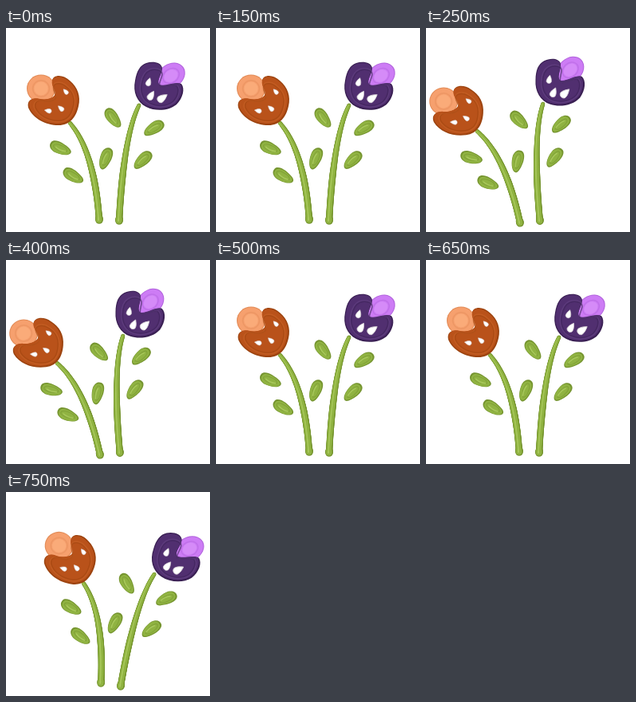
Write an HTML page that moves like this. It is 256 px wide and 256 px high and loops after 1 s.

```html
<!DOCTYPE html>
<html lang="en">
<head>
<meta charset="utf-8">
<title>Swaying flowers</title>
<style>
  html, body { margin: 0; width: 100%; height: 100%; overflow: hidden; background: #fff; }
  svg { display: block; width: 100vw; height: 100vh; }
</style>
</head>
<body>
<svg id="stage" viewBox="0 0 256 256"></svg>
<script>
const GREEN = { rim: '#75942f', main: '#90b342', light: '#a8c85c' };
const ORANGE = { rim: '#9c430f', main: '#b9521a', light: '#cd682d' };
const PEACH = { rim: '#e28c58', main: '#f6a06e', light: '#ffb888' };
const PURPLE = { rim: '#391f52', main: '#512f70', light: '#6c4a8a' };
const VIOLET = { rim: '#b163dc', main: '#cd7cf5', light: '#e09dfd' };

function add(parent, tag, attrs = {}) {
  const node = document.createElementNS('http://www.w3.org/2000/svg', tag);
  for (const key in attrs) node.setAttribute(key, attrs[key]);
  parent.appendChild(node);
  return node;
}

const stage = document.getElementById('stage');
const bouquet = add(stage, 'g');

const group = (parent, x, y, turn = 0, size = 1) => add(parent, 'g', {
  transform: `translate(${x} ${y}) rotate(${turn}) scale(${size})`
});

const line = (parent, d, stroke, width, extra = {}) => add(parent, 'path', {
  d, fill: 'none', stroke, 'stroke-width': width,
  'stroke-linecap': 'round', 'stroke-linejoin': 'round', ...extra
});

// Thick paint: a dark rim around a slightly smaller, raised face.
function paint(parent, d, color, inset = 0.95) {
  add(parent, 'path', { d, fill: color.rim });
  add(parent, 'path', { d, fill: color.main, transform: `translate(-.3 -.4) scale(${inset})` });
}

// Round beads along a cubic curve, growing thicker toward the foot.
function stem(x0, y0, x1, y1, x2, y2, x3, y3) {
  const bead = (shift, trim, fill) => {
    for (let i = 0; i <= 160; i++) {
      const t = i / 160, u = 1 - t;
      const at = (a, b, c, d) => u*u*u*a + 3*u*u*t*b + 3*u*t*t*c + t*t*t*d;
      const r = 2.4 + 1.7 * Math.min(1, t * 1.6) + (t > .98 ? .7 : 0);
      add(bouquet, 'circle', { cx: at(x0, x1, x2, x3) + shift, cy: at(y0, y1, y2, y3), r: r * trim, fill });
    }
  };
  bead(0, 1, GREEN.rim);
  bead(-.3, .74, GREEN.main);
  bead(-.9, .2, GREEN.light);
}

function leaf(x, y, turn) {
  const g = group(bouquet, x, y, turn);
  paint(g, 'M-14 0C-13-5-2-8 6-7.5C13-6 15-2 14 2C13 6 7 7.5 1 7C-7 6-15 4-14 0Z', GREEN, 0.88);
  line(g, 'M-9 0C-3-4 4-4 9-2C11 1 7 3.5 2 3.5C-3 4-8 3-9 0', GREEN.rim, 1, { opacity: .55 });
  line(g, 'M-7-1Q0-3 6-1', GREEN.light, 1.5);
}

function petal(parent, x, y, turn, rx, ry, color) {
  const g = group(parent, x, y, turn);
  const oval = (scale, attrs) => add(g, 'ellipse', { rx: rx * scale, ry: ry * scale, ...attrs });
  oval(1, { fill: color.rim });
  oval(.94, { fill: color.main });
  oval(.58, { fill: 'none', stroke: color.rim, 'stroke-width': 1.5, opacity: .45 });
  oval(.48, { fill: color.light, opacity: .45 });
}

function body(parent, d, color) {
  paint(parent, d, color);
  const ridge = (scale, stroke) => line(parent, d, stroke, 1.5 / scale, {
    transform: `translate(1 2) scale(${scale})`, opacity: .45
  });
  ridge(.8, color.light);
  ridge(.75, color.rim);
}

function spot(parent, x, y, turn, size) {
  add(group(parent, x, y, turn, size), 'path', {
    d: 'M-7 0C-4-2-1-4 3-4C7-3 7 3 3 4C-1 4-4 2-7 0Z',
    fill: '#fff', stroke: '#d9d2d8', 'stroke-width': .8
  });
}

stem(80, 119, 104, 146, 114, 196, 117, 241);
stem(167, 97, 150, 130, 144, 200, 142, 242);

leaf(68.5, 151, 205);
leaf(84.5, 185.5, 212);
leaf(134.5, 113, 234);
leaf(125, 164, -68);
leaf(185.5, 126, -31);
leaf(171.5, 166, -43);

const orange = group(bouquet, 60, 91);
petal(orange, -16, -15, 0, 18, 17.5, PEACH);
body(orange, 'M-2-25C-1-33 12-33 20-25C30-17 34-5 31 7C28 21 20 31 6 31C-10 31-26 23-32 9C-34 0-28-4-19-2C-11 0 0-2 2-8C3-13-3-18-2-25Z', ORANGE);
spot(orange, 15, -11, 48, .62);
spot(orange, 9, 10, 42, .68);
spot(orange, -7, 13, 12, .68);

const purple = group(bouquet, 192, 73);
petal(purple, 15, -13, -35, 19, 15, VIOLET);
body(purple, 'M-16-29C-8-32 3-30 4-23C4-15-3-8 0-2C8 2 20-6 28-3C33 3 30 15 22 23C12 31-4 32-16 26C-28 20-33 7-30-7C-28-19-24-26-16-29Z', PURPLE);
spot(purple, -13, -5, 108, .8);
spot(purple, -10, 12, 122, .95);
spot(purple, 4, 15, 145, 1.08);

// The bouquet tilts rigidly around its feet: centre, left, centre, right.
const STEP = 250;
const start = performance.now();
function tick() {
  const step = Math.floor((performance.now() - start) / STEP);
  const sway = -Math.round(Math.sin(step * Math.PI / 2));
  const angle = 7.6 * sway + 0.65 * -Math.abs(sway);
  const dx = 1.5 * Math.abs(sway) + 0.5 * sway;
  const dy = 1.25 * Math.abs(sway) - 0.75 * sway;
  bouquet.setAttribute('transform', `translate(${dx} ${dy}) rotate(${angle} 129.5 241.5)`);
  requestAnimationFrame(tick);
}
tick();
</script>
</body>
</html>
```
